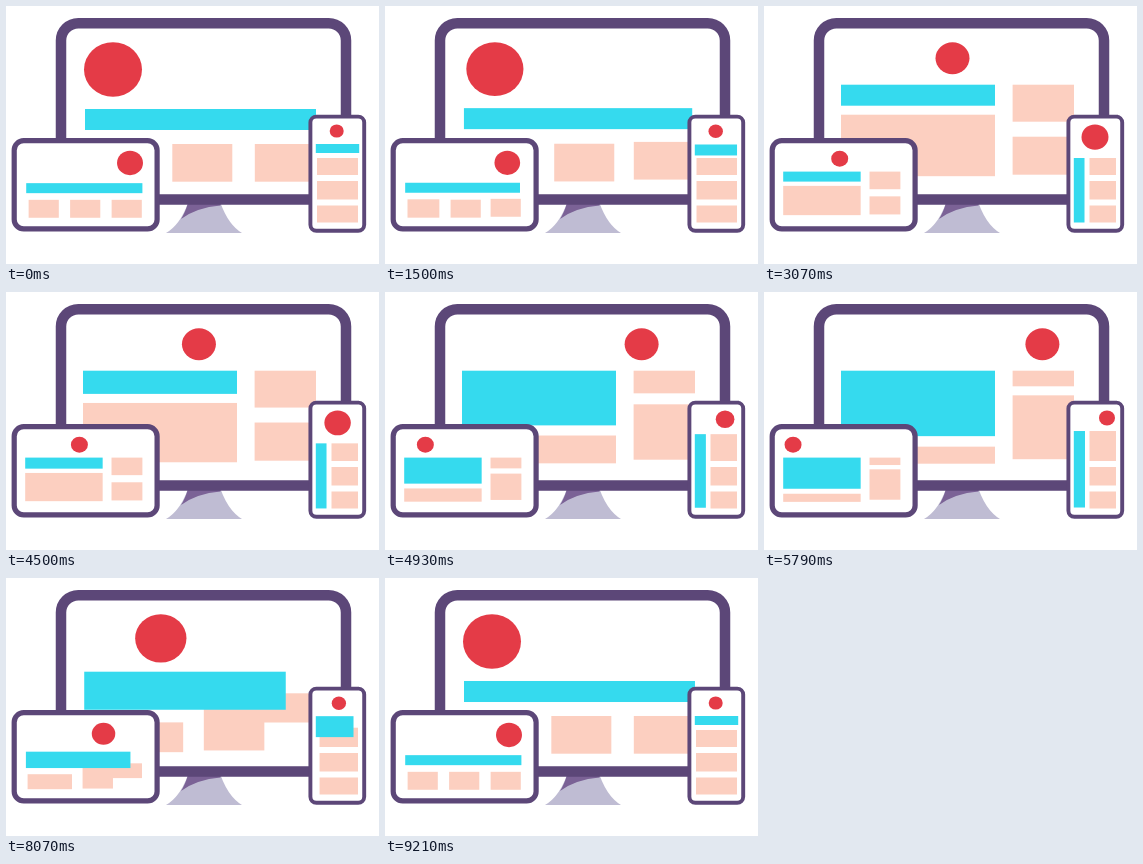
Recreate the animation shown at these times as an HTML page. Size 373 by 258 pixels, loop 9430 ms.

```html
<!DOCTYPE html>
<html lang="en">
<head>
<meta charset="utf-8">
<title>Responsive layouts</title>
<style>
  html, body { margin: 0; width: 100%; height: 100%; overflow: hidden; background: #fff; }
  svg { display: block; width: 100%; height: 100%; }
  .frame { fill: #fff; stroke: #5c4778; }
  .logo { fill: #e43b47; }
  .banner { fill: #35daee; }
  .card { fill: #fccfc0; }
</style>
</head>
<body>
<svg viewBox="0 0 373 258">
  <path fill="#bfbcd3" d="M160 227Q174 219 182 197H214.5Q222.500 219 236 227Z"/>
  <path fill="#7b6296" d="M182 197H214.500V199.500Q190.500 201.500 175 213Q179 207 182 197Z"/>
  <rect class="frame" x="55" y="17.2" width="285" height="176.2" rx="17.3" stroke-width="10.5"/>
  <g id="monitor"></g>
  <rect class="frame" x="8.2" y="134.7" width="142.9" height="88.2" rx="9.5" stroke-width="5.2"/>
  <g id="tablet"></g>
  <rect class="frame" x="304.4" y="110.6" width="53.8" height="114.2" rx="6" stroke-width="3.9"/>
  <g id="phone"></g>
</svg>
<script>
const LOOP = 9430, FPS = 14;
const MOVES = [{ start: 1348, span: 1700 }, { start: 4344, span: 1530 }, { start: 7467, span: 1700 }];

// Boxes are [x, y, width, height]; a layout is [banner, ...cards].
const stack = (x, width, top, heights, gap) => heights.map(height => {
  const box = [x, top, width, height];
  top += height + gap;
  return box;
});

const columns = (main, mainGap, side, sideGap) => [
  ...stack(77, 154, 78.7, main, mainGap),
  ...stack(248.6, 61.4, 78.7, side, sideGap),
];

const wideLayouts = [
  [[79, 103, 231, 21], ...[0, 2, 1].map(column => [83.8 + 82.5 * column, 138, 60, 37.7])],
  columns([21, 61.5], 9, [37, 38], 15),
  columns([65.5, 17], 10.5, [15.5, 64], 9),
];

const toTablet = ([x, y, width, height]) =>
  [19.2 + 0.503 * (x - 77), 165.5 + 0.476 * (y - 78.5), 0.503 * width, 0.476 * height];

const phoneCards = (x, top) => stack(x, 352 - x, top, [169 - top, 18.5, 17], 6);
const phoneLayouts = [
  [[309.8, 138, 43.4, 9], ...phoneCards(311, 152)],
  [[309.8, 152, 10.7, 64.5], ...phoneCards(325.5, 152)],
  [[309.8, 139, 11.2, 76.5], ...phoneCards(325.5, 139)],
];

// Logos keep their top edge and are slightly wider than high.
const logoPoses = (top, ...spots) => spots.map(([x, width]) => [x, top, width, width * 0.942]);

const screens = [
  { id: 'monitor', layouts: wideLayouts, lag: 102, sideLag: 92,
    logo: logoPoses(36.2, [78, 58], [171.5, 34], [261.5, 34]) },
  { id: 'tablet', layouts: wideLayouts.map(layout => layout.map(toTablet)), lag: 25, sideLag: 92,
    logo: logoPoses(144.7, [111, 26], [67.2, 17], [20.5, 17]) },
  { id: 'phone', layouts: phoneLayouts, lag: 0, sideLag: 0, lastSpan: 1360,
    logo: logoPoses(118.4, [323.7, 14], [317.5, 27], [335, 16]) },
];

const parts = [];

function add({ id, lastSpan = MOVES[2].span }, kind, poses, lags) {
  const el = document.createElementNS('http://www.w3.org/2000/svg', 'rect');
  el.setAttribute('class', kind);
  if (kind === 'logo') {
    el.setAttribute('rx', 99);
    el.setAttribute('ry', 99);
  }
  document.getElementById(id).append(el);
  const moves = MOVES.map(({ start, span }, i) => ({
    start: start + lags[i],
    span: i === 2 ? lastSpan : span,
  }));
  parts.push({ el, poses, moves });
}

for (const screen of screens) {
  // Cards first, so that the banner passes over them.
  for (const i of [1, 2, 3, 0]) {
    const poses = screen.layouts.map(layout => layout[i]);
    add(screen, i ? 'card' : 'banner', poses, [0, i > 1 ? screen.sideLag : 0, screen.lag]);
  }
  add(screen, 'logo', screen.logo, [0, 0, 0]);
}

// cubic-bezier(.33, 0, 0, 1)
function ease(x) {
  if (x <= 0) return 0;
  if (x >= 1) return 1;
  let low = 0, high = 1, s;
  for (let i = 0; i < 24; i++) {
    s = (low + high) / 2;
    if (0.99 * (1 - s) ** 2 * s + s ** 3 < x) low = s;
    else high = s;
  }
  return s * s * (3 - 2 * s);
}

function poseAt({ poses, moves }, time) {
  return moves.reduce((pose, { start, span }, i) => {
    const p = ease((time - start) / span);
    const next = poses[(i + 1) % poses.length];
    return pose.map((v, k) => v + (next[k] - v) * p);
  }, poses[0]);
}

function draw(elapsed) {
  // The motion advances in whole steps of 1/14 s.
  const time = Math.floor((elapsed % LOOP + 4) * FPS / 1000) * 1000 / FPS;
  for (const part of parts) {
    const pose = poseAt(part, time);
    ['x', 'y', 'width', 'height'].forEach((name, k) => part.el.setAttribute(name, pose[k].toFixed(2)));
  }
}

const begin = performance.now();
function tick() {
  draw(performance.now() - begin);
  requestAnimationFrame(tick);
}
tick();
</script>
</body>
</html>
```
